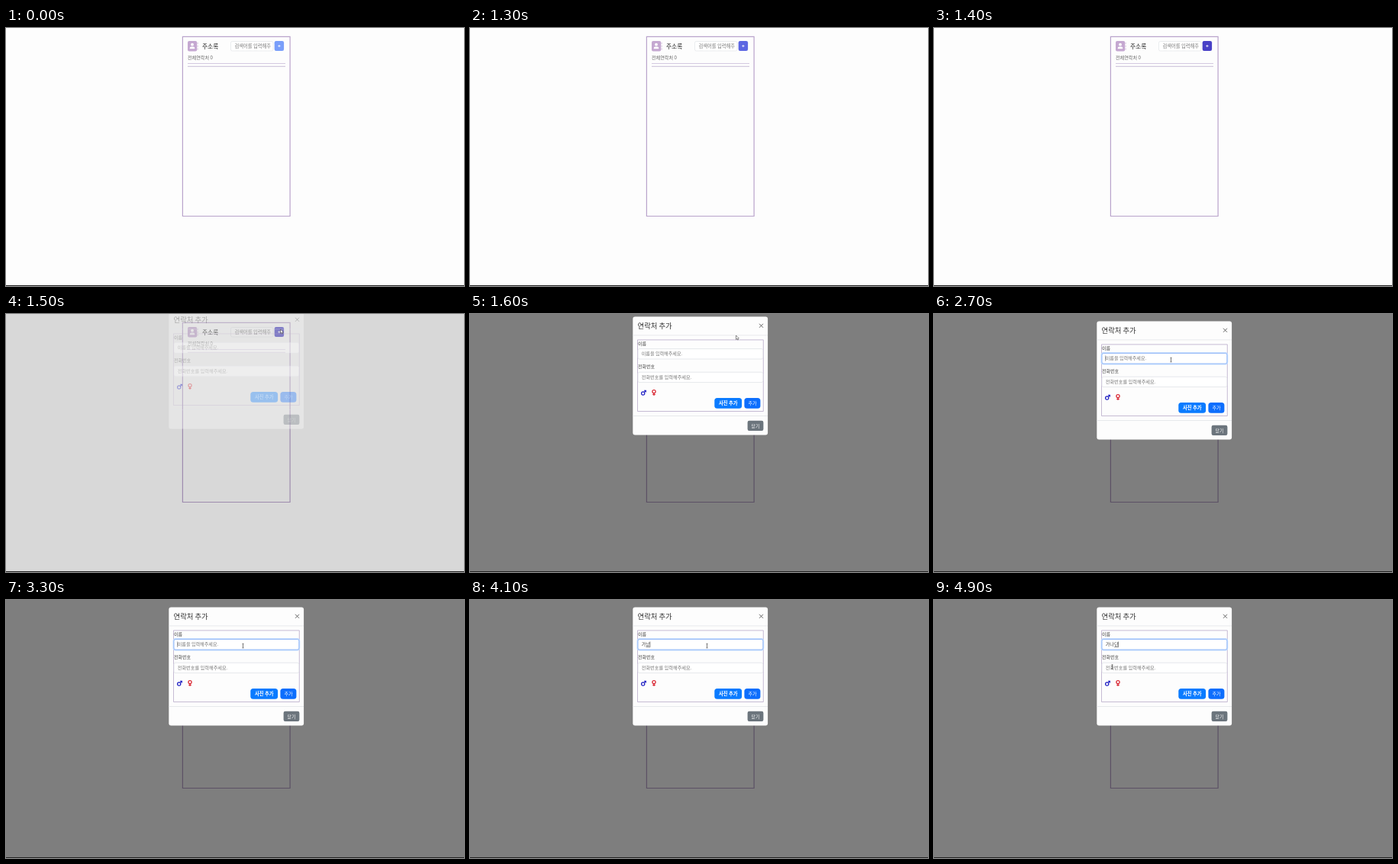
Write an HTML page with a canvas that moves like this. It is 600 px wide and 338 px high and loops after 5 s.

```html
<!DOCTYPE html>
<html lang="ko">
<head>
<meta charset="utf-8">
<title>주소록</title>
<style>
  html, body { margin: 0; width: 100%; height: 100%; overflow: hidden; background: #fdfdfd; }
  canvas { display: block; width: 600px; height: 338px; }
</style>
</head>
<body>
<canvas id="stage" width="600" height="338"></canvas>
<script>
const ctx = document.getElementById('stage').getContext('2d');
const LOOP = 5000, STEP = 100;
const FONT = '"Noto Sans CJK KR", "Noto Sans CJK", sans-serif';

// The latest value in [[time, value], ...] that has started.
const at = (keys, t) => keys.reduce((value, [start, v]) => t >= start ? v : value, keys[0][1]);

// Position interpolated along [[time, x, y], ...].
function along(path, t) {
  const i = path.findIndex(p => p[0] >= t);
  if (i < 0) return path[path.length - 1].slice(1);
  if (i === 0) return path[0].slice(1);
  const [t0, x0, y0] = path[i - 1], [t1, x1, y1] = path[i];
  const k = (t - t0) / (t1 - t0);
  return [x0 + (x1 - x0) * k, y0 + (y1 - y0) * k];
}

function text(str, x, midY, size, color, weight = 400, align = 'left') {
  ctx.font = `${weight} ${size}px ${FONT}`;
  ctx.textAlign = align;
  ctx.fillStyle = color;
  ctx.fillText(str, x, midY + size * 0.37);
}

function box(x, y, w, h, r, fill, stroke, lineWidth = 1) {
  ctx.beginPath();
  ctx.roundRect(x, y, w, h, r);
  if (fill) { ctx.fillStyle = fill; ctx.fill(); }
  if (stroke) { ctx.strokeStyle = stroke; ctx.lineWidth = lineWidth; ctx.stroke(); }
}

function line(points, color, width) {
  ctx.beginPath();
  points.forEach(([x, y]) => ctx.lineTo(x, y));
  ctx.strokeStyle = color;
  ctx.lineWidth = width;
  ctx.stroke();
}

function ring(x, y, r, color, width) {
  ctx.beginPath();
  ctx.arc(x, y, r, 0, Math.PI * 2);
  ctx.strokeStyle = color;
  ctx.lineWidth = width;
  ctx.stroke();
}

function button(label, x, y, w, h, r, fill, weight, size = 6) {
  box(x, y, w, h, r, fill);
  text(label, x + w / 2, y + h / 2, size, '#fff', weight, 'center');
}

function contactIcon() {
  box(238, 17, 12.2, 13.6, 2, '#c5a8d1');
  for (const y of [18.7, 22.5, 26.3]) box(250.6, y, 1, 2.4, 0.4, '#d6c3de');
  ctx.fillStyle = '#fff';
  ctx.beginPath();
  ctx.arc(244, 21.7, 1.9, 0, Math.PI * 2);
  ctx.fill();
  box(240.7, 24.4, 6.6, 2.8, [2, 2, 0.4, 0.4], '#fff');
}

function page(t) {
  ctx.fillStyle = '#fdfdfd';
  ctx.fillRect(0, 0, 600, 338);
  box(231.4, 11.3, 140.7, 235.2, 0, null, '#b9a3cb', 1.2);
  contactIcon();
  text('주소록', 257, 24, 7.7, '#222', 500);
  box(294.5, 17.5, 55.5, 12.5, 2, '#fff', '#e3e5e9', 0.7);
  text('검색어를 입력해주', 299.5, 23.7, 6.25, '#777');
  const fill = at([[0, '#799efa'], [1300, '#5c66e2'], [1400, '#4840c6']], t);
  box(351.7, 17, 12.4, 13, 2.2, fill);
  line([[356.3, 23.6], [359.5, 23.6]], '#fff', 0.8);
  line([[357.9, 22], [357.9, 25.2]], '#fff', 0.8);
  text('전체연락처 0', 238, 39.2, 6.1, '#666');
  line([[238, 46.5], [366, 46.5]], '#d3c9e0', 1);
  line([[238, 50.3], [366, 50.3]], '#c9bdd8', 1);
}

function genderIcons() {
  const blue = '#2222c4', red = '#d8202c';
  ring(226.7, 110, 2.1, blue, 1.2);
  line([[228.2, 108.5], [230.3, 106.4]], blue, 1.1);
  line([[228, 106.2], [230.4, 106.2], [230.4, 108.6]], blue, 1.1);
  ring(241, 107.6, 2.1, red, 1.2);
  line([[241, 109.7], [241, 113]], red, 1.1);
  line([[239.2, 111.4], [242.8, 111.4]], red, 1.1);
}

function nameField(t) {
  const focused = t >= 1900;
  if (focused) box(219.7, 51.2, 164.4, 14.2, 2.4, null, '#c2dbfe', 2.2);
  box(220, 51.6, 163.8, 13.4, 2, '#fff', focused ? '#86aff5' : '#e0e3e8', 0.8);

  const typed = at([[0, ''], [3800, '가'], [3900, '간'], [4000, '가나'],
    [4100, '가낟'], [4200, '가나다'], [4600, '가나단']], t);
  text(typed || '이름을 입력해주세요.', 224.7, 58.2, 6.1, typed ? '#444' : '#777');

  const end = 224.7 + (typed ? ctx.measureText(typed).width : 0);
  if (typed) line([[end - 5.4, 61.7], [end, 61.7]], '#555', 0.6);
  const caret = focused && (t < 2800 || t >= 3300);
  if (caret) line([[end, 54.5], [end, 61.7]], '#444', 0.6);
}

function modal(t) {
  ctx.save();
  ctx.globalAlpha = t < 1600 ? 0.35 : 1;
  ctx.translate(0, at([[1500, -14], [1600, -6], [1700, -1.5], [1800, 0]], t));

  box(213.3, 9.6, 176.8, 155, 3, '#fdfdfd');
  text('연락처 추가', 219.5, 21.4, 9.4, '#333');
  line([[379, 18.8], [384, 23.8]], '#555', 0.9);
  line([[384, 18.8], [379, 23.8]], '#555', 0.9);
  line([[213.5, 33.9], [390, 33.9]], '#e2e5e9', 0.8);
  line([[213.5, 139.5], [390, 139.5]], '#e2e5e9', 0.8);

  box(219.5, 39.9, 164.8, 93.6, 0, null, '#b9abc9', 0.8);
  text('이름', 220, 44.6, 6, '#444');
  nameField(t);
  text('전화번호', 220, 75.2, 6, '#444');
  box(220, 82.2, 163.8, 13.4, 2, '#fff', '#e0e3e8', 0.8);
  text('전화번호를 입력해주세요.', 224.7, 88.9, 6.2, '#777');
  genderIcons();
  button('사진 추가', 320.3, 116, 35.8, 13.8, 3.6, '#0a7bff', 700, 6.3);
  button('추가', 359.4, 116, 21, 13.8, 3.6, '#0d6efd', 500);
  button('닫기', 363.6, 145.8, 20.8, 13.2, 2.2, '#6c757d', 500);
  ctx.restore();
}

function arrow(x, y) {
  ctx.beginPath();
  for (const [dx, dy] of [[0, 0], [0, 5.4], [1.3, 4.3], [2.1, 6], [3, 5.6], [2.2, 3.9], [3.8, 3.8]])
    ctx.lineTo(x + dx, y + dy);
  ctx.closePath();
  ctx.fillStyle = '#fff';
  ctx.fill();
  ctx.strokeStyle = '#444';
  ctx.lineWidth = 0.6;
  ctx.stroke();
}

function textCursor(x, y) {
  line([[x, y - 2.8], [x, y + 2.8]], '#555', 0.8);
  for (const dy of [-2.8, 2.8]) line([[x - 1.2, y + dy], [x + 1.2, y + dy]], '#555', 0.6);
}

function pointer(t) {
  const [x, y] = along([[1500, 359.5, 20], [1600, 348.5, 28], [1800, 310, 53], [1900, 296, 57],
    [2000, 294.5, 57.5], [2300, 310.5, 60], [4500, 310.5, 60], [4900, 233.5, 87.5]], t);
  if (t < 1800) arrow(x, y);
  else textCursor(x, y);
}

function draw(t) {
  page(t);
  if (t >= 1500) {
    ctx.fillStyle = `rgba(0, 0, 0, ${t < 1600 ? 0.145 : 0.5})`;
    ctx.fillRect(0, 0, 600, 338);
    modal(t);
    pointer(t);
  }
  ctx.fillStyle = '#222';
  ctx.fillRect(0, 337, 600, 1);
}

const start = performance.now();
function frame() {
  const t = (performance.now() - start) % LOOP;
  draw(Math.floor(t / STEP) * STEP);
  requestAnimationFrame(frame);
}
frame();
</script>
</body>
</html>
```
